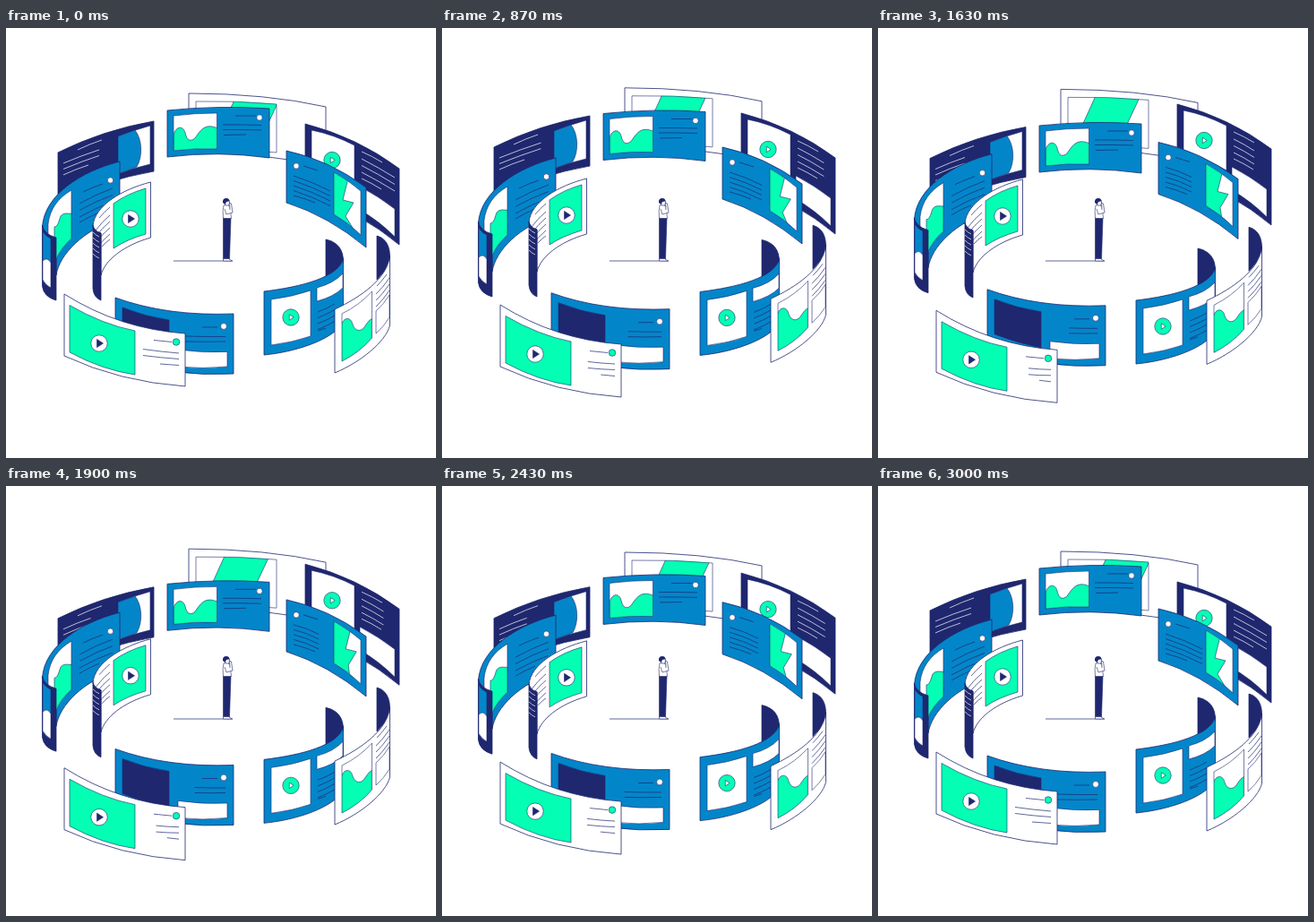
An HTML page with a canvas for the animation above (3030 ms loop, 480 px wide and 480 px high).

```html
<!DOCTYPE html>
<html lang="en">
<head>
<meta charset="utf-8">
<title>Ring of panels</title>
<style>
html, body { margin: 0; width: 100%; height: 100%; overflow: hidden; background: #fff; }
canvas { display: block; width: 480px; height: 480px; }
</style>
</head>
<body>
<canvas id="stage"></canvas>
<script>
const NAVY = '#1f276f', BLUE = '#0386c9', GREEN = '#04ffb4', WHITE = '#fff';
const LOOP = 3030, END = 3000;
const KEYS = [0, 430, 870, 1630, 2170, 2670];

const canvas = document.getElementById('stage');
const ctx = canvas.getContext('2d');
const ratio = window.devicePixelRatio || 1;
canvas.width = canvas.height = 480 * ratio;

// Smooth periodic curve through the values at KEYS.
function curve(vals, t) {
  const n = KEYS.length;
  const time = i => KEYS[(i + n) % n] + Math.floor(i / n) * END;
  const val = i => vals[(i + n) % n];
  const slope = i => (val(i + 1) - val(i - 1)) / (time(i + 1) - time(i - 1));
  let i = n - 1;
  while (KEYS[i] > t) i--;
  const h = time(i + 1) - time(i), u = (t - time(i)) / h;
  const a = u * u * (3 - 2 * u);
  return val(i) * (1 - a) + val(i + 1) * a +
    h * u * (1 - u) * ((1 - u) * slope(i) - u * slope(i + 1));
}

function shape(d, fill, stroke = NAVY, width = 0.6) {
  const p = new Path2D(d);
  if (fill) { ctx.fillStyle = fill; ctx.fill(p); }
  if (stroke) { ctx.strokeStyle = stroke; ctx.lineWidth = width; ctx.stroke(p); }
}

// The body of a panel, with a stronger outline.
function panel(d, fill) {
  shape(d, fill, NAVY, 0.8);
}

// A white picture frame with one green shape clipped to it.
function picture(frame, art) {
  shape(frame, WHITE, null);
  ctx.save();
  ctx.clip(new Path2D(frame));
  shape(art, GREEN);
  ctx.restore();
  shape(frame, null);
}

function dot(x, y, r, fill) {
  ctx.beginPath();
  ctx.arc(x, y, r, 0, Math.PI * 2);
  ctx.fillStyle = fill;
  ctx.fill();
  ctx.strokeStyle = NAVY;
  ctx.lineWidth = 0.6;
  ctx.stroke();
}

function play(x, y, disc, mark) {
  const k = mark === NAVY ? 1 : 0.7;
  dot(x, y, 9.2, disc);
  shape(`M${x - 2.5 * k},${y - 4.6 * k} L${x + 4.5 * k},${y} L${x - 2.5 * k},${y + 4.6 * k} Z`, mark);
}

// A text rule; bend lifts or lowers its middle.
function rule(x1, y1, x2, y2, color = NAVY, bend = 0) {
  shape(`M${x1},${y1} Q${(x1 + x2) / 2},${(y1 + y2) / 2 + bend} ${x2},${y2}`, null, color, 0.7);
}

function rules(n, step, x1, y1, x2, y2, color, bend) {
  for (let i = 0; i < n; i++) rule(x1, y1 + i * step, x2, y2 + i * step, color, bend);
}

function backWhite(s, t) {
  const x = curve([0, -5, -9, -12, -8, -2], t);
  panel('M204,73 Q290,73 357,88 V155 Q290,139 204,139 Z', WHITE);
  picture('M212,82 Q258,81 302,85 V139 Q258,135 212,135 Z',
    `M${256 + x},78 L${306 + x},78 L${276 + x},142 L${227 + x},142 Z`);
}

function backNavy(s) {
  const end = 104 - 7 * s, rise = 15 - 2 * s;
  panel('M58,139 Q108,114 165,104 V160 Q108,170 58,195 Z', NAVY);
  shape('M125,121 Q143,114 161,109 V152 Q143,156 125,163 Z', WHITE);
  shape('M125,121 L144,114 C152,124 153,143 146,155 L125,163 Z', BLUE);
  rule(80, 136, 107, 125, WHITE, -1);
  rules(2, 6.5, 64, 151, end, 151 - rise, WHITE, -1);
  rule(64, 164, 92, 153, WHITE, -1);
}

function backBlue() {
  panel('M180,92 Q237,86 294,90 V145 Q237,137 180,144 Z', BLUE);
  picture('M187,98 Q210,95 235.5,95 V135 Q210,134 187,137 Z',
    'M187,119 C190,109 198,109 200,117 C202,126 206,127 211,123 C215,117 219,111 225,110 C230,109 233,111 237,112 V140 H187 Z');
  rule(256, 98, 279, 98);
  rule(242, 108, 285, 108.5, NAVY, -0.5);
  rule(242, 113.5, 285, 114, NAVY, -0.5);
  rule(243, 119.5, 268, 119);
  dot(283, 100, 3.2, WHITE);
}

function rightNavy(s) {
  const end = 434 - 14 * s, drop = 21 - 8 * s;
  panel('M334,107 Q392,122 439,157 V242 Q395,205 334,185 Z', NAVY);
  shape('M341,114 Q366,119 389,131 V181 Q366,168 341,163 Z', WHITE);
  play(364, 147.5, GREEN, WHITE);
  rule(397, 138, 420, 150, WHITE, -1);
  rules(3, 7.5, 397, 146, end, 146 + drop, WHITE, -1);
  rule(397, 168, 419, 180, WHITE, -1);
  shape('M395,177 Q416,188 434,202 V233 Q416,215 395,203 Z', WHITE);
}

function rightBlue(s) {
  const x = 3 * s, end = 362 - 12 * s, drop = 17 - 6 * s;
  panel('M313,137 Q360,147 402,178 V245 Q360,210 313,195 Z', BLUE);
  picture('M366,161 Q382,170 396,182 V231 Q382,217 366,208 Z',
    `M364,155 L${382 + x},168 L${376 + x},192 L${388 + x},195 L${379 + x},210 L${387 - x},223 L364,212 Z`);
  dot(324, 154, 3.2, WHITE);
  rule(332, 154, 348, 159);
  rules(4, 5.5, 321, 165, end, 165 + drop, NAVY, -2);
  rule(321, 187, 345, 195, NAVY, -1);
}

function leftBlue() {
  panel('M127,149 C84,160 43,186 40.5,222 Q43,230 56,234 V276 C60,252 86,226 127,212 Z', BLUE);
  picture('M73,181 C58,190 49,202 47,219 V252 L56,258 Q61,246 73,235 Z',
    'M54,222 C58,222 59,215 61,210 C65,205 70,208 74,207 V240 L54,264 Z');
  dot(116.5, 170, 3.2, WHITE);
  rule(86, 183, 108, 174, NAVY, -1);
  rules(3, 7.5, 82, 196, 119, 179, NAVY, -2);
  rule(82, 217, 104, 206, NAVY, -1);
  panel('M40.5,220 Q42,230 56,234 V304 Q42,300 40.5,288 Z', NAVY);
  shape('M41,227 Q44,232 50,235 V290 Q44,287 41,281 Z', BLUE);
  shape('M41,260 Q46,255 50,262 V290 Q44,287 41,281 Z', WHITE);
}

function leftWhite() {
  panel('M161.5,172 C130,180 99,198 97,221 Q99,227 106,229 V276 C110,260 130,243 161.5,234 Z', WHITE);
  shape('M120,196 Q135,185 156,179 V230 Q135,236 120,246 Z', GREEN);
  play(139, 213, WHITE, NAVY);
  rule(104, 212, 116, 200, NAVY, -1);
  rules(4, 7, 100, 226, 116, 209, NAVY, -2);
  rule(107, 244, 116, 236, NAVY, -1);
  panel('M97,220 Q98,227 106,229 V304 Q98,301 97,291 Z', NAVY);
  rules(5, 6, 97, 228, 104, 233, WHITE, 1);
}

function frontBlue(s) {
  const x = 200 + 13 * s;
  panel('M122,301 Q180,322 254,319 V386 Q185,390 122,368 Z', BLUE);
  shape('M130,312 Q155,322 182,326 V366 Q155,361 130,351 Z', NAVY);
  shape('M192,359 Q220,363 247,361.5 V378 Q220,381 192,378 Z', WHITE);
  rule(219, 334, 236, 334);
  rule(x, 344, 245, 344.5, NAVY, 0.5);
  rule(x, 350, 245, 350, NAVY, 0.5);
  dot(243, 333, 3.4, WHITE);
}

function frontWhite(s) {
  const x = 153 + 15 * s, y = 3 * s;
  panel('M65,297 Q127,336 200,341 V400 Q127,395 65,366 Z', WHITE);
  shape('M71,309.5 Q108,331 144,338 V387 Q108,382 71,362 Z', GREEN);
  play(104, 352, WHITE, NAVY);
  rule(165, 348.5, 185, 350.5);
  rule(x, 358.5 + y, 193, 363, NAVY, 0.6);
  rule(x, 365.5 + y, 193, 369.5, NAVY, 0.6);
  rule(172 + 8 * s, 375, 193, 376.5);
  dot(190, 350.5, 3.8, GREEN);
}

function cornerBlue() {
  panel('M357,236 C370,239 377,247 376.5,262 L370,274 L357,280 Z', NAVY);
  panel('M288,294 C330,289 372,278 376.5,257 V326 C372,344 330,361 288,365 Z', BLUE);
  shape('M296,303 Q320,300 340,293 V344 Q320,351 296,354 Z', WHITE);
  play(318, 323, GREEN, WHITE);
  shape('M347,290 Q366,285 376,274 V290 Q366,300 347,305 Z', WHITE);
  rules(4, 6.5, 348, 317, 367, 308, NAVY, 1);
  rule(348, 338, 357, 335);
}

function cornerWhite() {
  panel('M414,232 C424,235 429,243 428.5,258 L422,272 L414,281 Z', NAVY);
  panel('M367,314 C395,301 426,280 428.5,254 V332 C424,350 396,373 367,385 Z', WHITE);
  picture('M375,319 Q395,309 408.5,294 V346 Q395,362 375,372 Z',
    'M374,334 C375,323 385,321 387,331 C390,339 396,339 400,334 C404,328 406,325 410,324 V375 H374 Z');
  rule(414, 288, 425, 275, NAVY, 1);
  rules(3, 7, 413, 297, 428, 279, NAVY, 2);
  shape('M413,316 Q422,308 428,298 V323 Q422,333 413,341 Z', WHITE);
}

function person() {
  rule(187, 260, 253, 260);
  shape('M242.5,212 L251,212 L249.5,258 L242.5,258 Z', NAVY);
  shape('M242.5,257.5 H248.5 L252.5,260 H242.5 Z', WHITE);
  shape('M243,198 Q247,196 250,199 L251.5,212.5 H242.5 Q241.5,204 243,198 Z', WHITE);
  shape('M244.5,193 L249.5,193 L249,198 L245,198 Z', WHITE);
  shape('M242,195 Q241.5,190 246,190 Q249,190 249.5,193 L246,194 L244.5,197 Z', NAVY, null);
  shape('M244,202 L246,208 L253,206 L251.5,196 L249.5,195 L250,203', WHITE);
}

// [draw, vertical offsets at KEYS], from back to front
const PANELS = [
  [backWhite, [0, -4, -6.2, -4.6, -0.8, 2]],
  [backNavy, [0, -7, -6, 6.5, 9.5, 6.5]],
  [backBlue, [0, -2, 3.5, 17, 15, 5.5]],
  [rightNavy, [0, -3, -12, -22, -15, -5]],
  [rightBlue, [0, -1, -4, -9.5, -9.5, -4.5]],
  [leftBlue, [0, -1.2, -4, -8.3, -6.5, -3]],
  [leftWhite, [0, -2, -4, -3, 0.5, 0.7]],
  [person, [0, 0, 0, 0, 0, 0]],
  [frontBlue, [0, -1, -5.3, -9.2, -4.8, -0.8]],
  [frontWhite, [0, 5, 12, 18.3, 15.2, 6.5]],
  [cornerBlue, [0, -3, 0.4, 10, 11, 5.4]],
  [cornerWhite, [0, -6.5, -11.7, -9.7, -3.8, 0.3]]
];

function draw(now) {
  const t = Math.min(now % LOOP, END - 0.01);
  ctx.setTransform(ratio, 0, 0, ratio, 0, 0);
  ctx.fillStyle = WHITE;
  ctx.fillRect(0, 0, 480, 480);
  ctx.lineJoin = 'round';
  for (const [paint, offsets] of PANELS) {
    const y = curve(offsets, t);
    ctx.save();
    ctx.translate(0, y);
    paint(offsets[3] ? y / offsets[3] : 0, t);
    ctx.restore();
  }
}

const start = performance.now();
function tick() {
  draw(performance.now() - start);
  requestAnimationFrame(tick);
}
tick();
</script>
</body>
</html>
```
